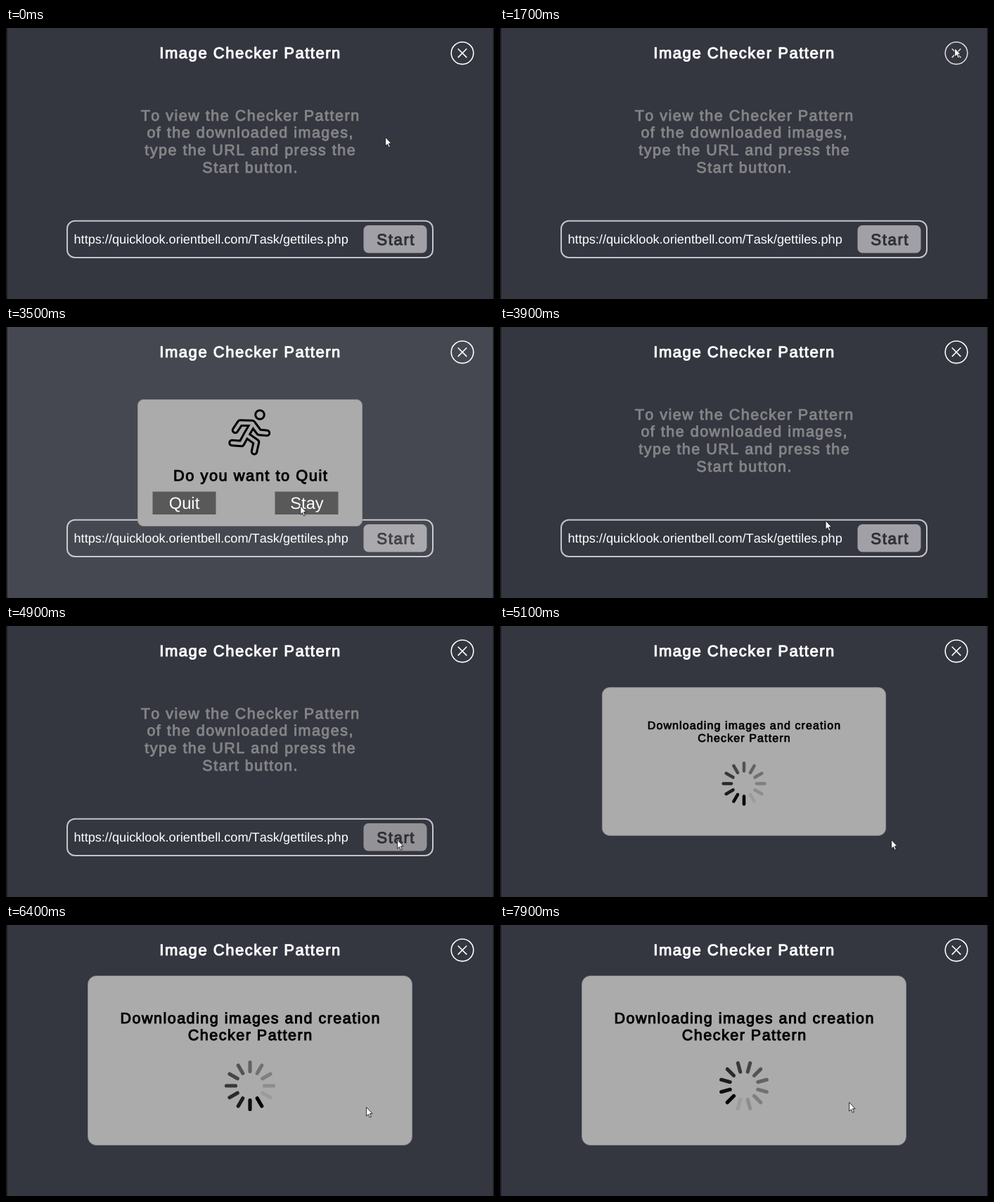
Animation of 694 by 386 pixels, one loop 8000 ms. Source, as an HTML page:

```html
<!DOCTYPE html>
<html lang="en">
<head>
<meta charset="utf-8">
<title>Image Checker Pattern</title>
<style>
  html, body { margin: 0; width: 100%; height: 100%; overflow: hidden; background: #1d1d20; }
  svg { display: block; width: 100vw; height: 100vh; }
  text { font-family: "Liberation Sans", Arial, sans-serif; font-kerning: none; text-anchor: middle; text-rendering: geometricPrecision; }
  .bold { font-size: 21.5px; letter-spacing: .07em; stroke-width: 1px; }
  .white { fill: #fff; stroke: #fff; }
  .black { fill: #000; stroke: #000; }
  .grey { fill: #858587; stroke: #858587; stroke-width: .9px; }
  .dark { fill: #2f3036; stroke: #2f3036; }
  .plain { fill: #fff; font-size: 23.7px; }
  .runner { fill: none; stroke-linecap: round; stroke-linejoin: round; }
</style>
</head>
<body>
<svg viewBox="0 0 694 386" preserveAspectRatio="none">
  <defs>
    <g id="limbs">
      <path d="M351 138L341 155L335 166L321.500 165"/>
      <path d="M342 154L356 164L353 177.500"/>
      <path d="M350 137L333 136.500L326 147"/>
      <path d="M351 138L360 150L371 151"/>
    </g>
  </defs>
  <rect x="2" y="0" width="690.500" height="386" fill="#343640"/>

  <g id="intro">
    <g class="bold grey">
      <text x="347.700" y="131.800">To view the Checker Pattern</text>
      <text x="347.700" y="156.400">of the downloaded images,</text>
      <text x="347.700" y="181">type the URL and press the</text>
      <text x="347.700" y="205.600">Start button.</text>
    </g>
    <rect x="87" y="274.700" width="520" height="52.300" rx="11" fill="none" stroke="#c4c4c9" stroke-width="2"/>
    <text x="96.500" y="307" fill="#fff" font-size="18.150" style="text-anchor:start">https://quicklook.orientbell.com/Task/gettiles.php</text>
    <rect id="start" x="508.500" y="281" width="90" height="39.500" rx="7"/>
    <text class="bold dark" x="554.700" y="308.500" style="font-size:22.300px">Start</text>
  </g>

  <rect id="veil" x="2" y="0" width="690.500" height="386" fill="#fff" opacity=".09"/>

  <text class="bold white" x="347.600" y="43.400" style="font-size:22px">Image Checker Pattern</text>
  <g id="close" fill="none" stroke="#fff">
    <circle cx="649" cy="35.800" r="15.800" stroke-width="1.600"/>
    <path d="M642.700 29.500L655.300 42.100M655.300 29.500L642.700 42.100" stroke-width="1.600"/>
  </g>

  <g id="dialog">
    <rect x="187.500" y="103.500" width="319" height="180" rx="8" fill="#ababab" stroke="#929294"/>
    <g class="runner">
      <use href="#limbs" stroke="#000" stroke-width="10.500"/>
      <use href="#limbs" stroke="#ababab" stroke-width="4.500"/>
      <circle cx="361" cy="125" r="6.300" stroke="#000" stroke-width="3"/>
    </g>
    <text class="bold black" x="348.200" y="219" style="font-size:21.800px">Do you want to Quit</text>
    <path d="M208.500 234.500h90v32.500h-90zM382.500 234.500h90v32.500h-90z" fill="#595959"/>
    <text class="plain" x="253.500" y="259">Quit</text>
    <text class="plain" x="428" y="259">Stay</text>
  </g>

  <g id="panel">
    <rect x="116.500" y="72.500" width="461" height="241" rx="12" fill="#ababab" stroke="#88888b"/>
    <g id="message" class="bold black">
      <text x="347.700" y="139.800">Downloading images and creation</text>
      <text x="347.700" y="164.400">Checker Pattern</text>
    </g>
    <g id="spinner" stroke="#000" stroke-width="5.200" stroke-linecap="round"></g>
  </g>

  <path id="cursor" d="M-.4 -.4V12.100L2.400 9.500L4.400 14.100L6.400 13.200L4.400 8.700H8.100Z" fill="#fff" stroke="#1a1a1c" stroke-width=".9"/>
</svg>
<script>
const LOOP = 8000, STEP = 100, BARS = 12;
const el = id => document.getElementById(id);
const clamp = v => Math.min(1, Math.max(0, v));
const progress = (t, from, to) => clamp((t - from) / (to - from));
const easeOut = p => 1 - (1 - p) ** 3;

// Pointer path: time, x, y
const path = [
  [400, 540, 156], [600, 525, 145], [700, 528, 130], [1000, 588, 75], [1300, 647, 29],
  [1800, 647, 29], [2500, 501, 35], [2900, 246, 244], [3200, 419, 255],
  [3600, 419, 255], [4300, 532, 309], [4600, 557, 305],
  [5600, 557, 305], [6400, 513, 260], [6800, 528, 264], [7400, 557, 212],
  [7500, 556, 203], [7900, 497, 253]
];

function pointer(t) {
  const i = path.findIndex(k => k[0] >= t);
  if (i < 1) return path[i < 0 ? path.length - 1 : 0].slice(1);
  const [t0, x0, y0] = path[i - 1], [t1, x1, y1] = path[i];
  const p = progress(t, t0, t1), e = p * p * (3 - 2 * p);
  return [x0 + (x1 - x0) * e, y0 + (y1 - y0) * e];
}

function show(node, on) { node.setAttribute("visibility", on ? "visible" : "hidden"); }

function scaleAt(node, x, y, s) {
  node.setAttribute("transform", `translate(${x} ${y}) scale(${s}) translate(${-x} ${-y})`);
}

for (let i = 0; i < BARS; i++) {
  const bar = document.createElementNS("http://www.w3.org/2000/svg", "line");
  bar.setAttribute("y1", -20.5);
  bar.setAttribute("y2", -33.5);
  bar.setAttribute("opacity", 1 - i / BARS);
  bar.setAttribute("transform", `rotate(${i * 360 / BARS})`);
  el("spinner").append(bar);
}

function draw(t) {
  const dialog = easeOut(progress(t, 1700, 2100)) * (1 - progress(t, 3500, 3800));
  const panel = easeOut(progress(t, 4900, 5300));

  show(el("veil"), dialog > 0);
  show(el("dialog"), dialog > 0);
  scaleAt(el("dialog"), 347, 193.5, dialog);

  show(el("intro"), panel === 0);
  show(el("panel"), panel > 0);
  scaleAt(el("panel"), 347, 193, panel);
  scaleAt(el("message"), 347, 144.5, Math.min(1, .95 + (t - 5500) / 4000));

  // The spinner turns backwards and then hangs
  const angle = 60 - .3 * (Math.min(t, 7350) - 5500);
  el("spinner").setAttribute("transform", `translate(347 229) rotate(${angle})`);

  el("close").setAttribute("opacity", t >= 1700 && t < 1800 ? .82 : 1);
  el("start").setAttribute("fill", t >= 4800 && t < 5000 ? "#929297" : "#a0a0a6");

  const [x, y] = pointer(t);
  el("cursor").setAttribute("transform", `translate(${x} ${y})`);
}

const began = performance.now();
function tick() {
  const t = (performance.now() - began) % LOOP;
  draw(Math.floor(t / STEP) * STEP);
  requestAnimationFrame(tick);
}
tick();
</script>
</body>
</html>
```
